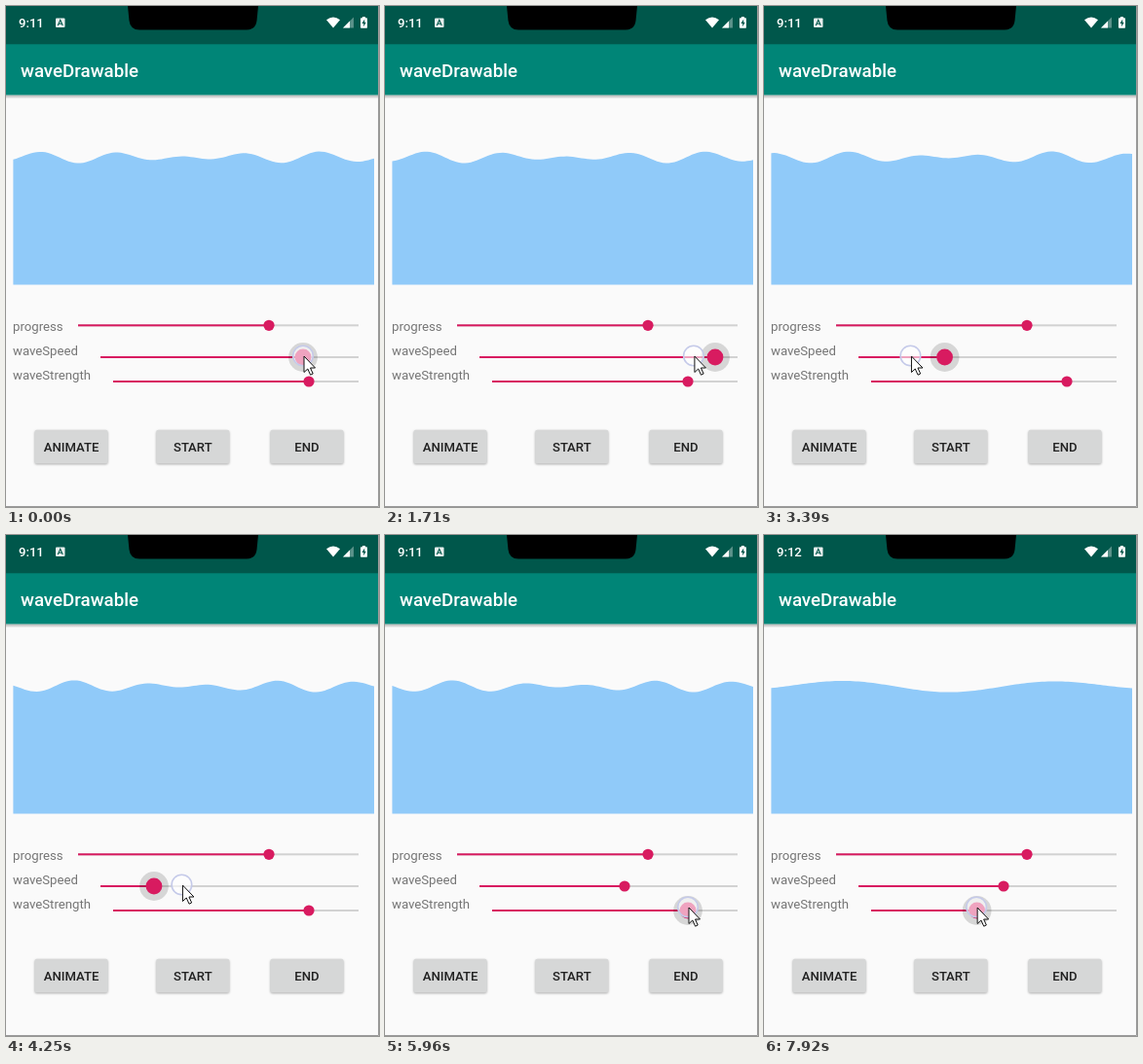
Write an HTML page that moves like this. It is 383 px wide and 515 px high and loops after 8000 ms.

```html
<!DOCTYPE html>
<html lang="en">
<head>
<meta charset="utf-8">
<title>Wave sliders</title>
<style>
  html, body { margin: 0; width: 100%; height: 100%; overflow: hidden; background: #fafafa; }
  svg { display: block; width: 100vw; height: 100vh; font-family: Roboto, sans-serif; font-size: 13.1px; }
  .medium { font-weight: 500; }
  .label { fill: #757575; font-size: 13.2px; }
  .button rect { fill: #d6d7d7; filter: drop-shadow(0 1px 1px rgba(0, 0, 0, .3)); }
  .button text { fill: #212121; font-weight: 500; text-anchor: middle; }
</style>
</head>
<body>
<svg viewBox="0 0 383 515">
  <defs>
    <linearGradient id="shade" x2="0" y2="1">
      <stop stop-color="#000" stop-opacity=".3"/>
      <stop offset="1" stop-color="#000" stop-opacity="0"/>
    </linearGradient>
  </defs>
  <rect width="383" height="515" fill="#fafafa"/>
  <rect y="91.500" width="383" height="4" fill="url(#shade)"/>
  <rect y="38" width="383" height="53.500" fill="#008577"/>
  <rect width="383" height="39.300" fill="#00574b"/>
  <path d="M125 0L126.500 15Q127.500 24.500 137 24.500H247Q256.500 24.500 257.500 15L259 0Z"/>

  <g fill="#fff">
    <text id="clock" class="medium" x="13" y="22"></text>
    <rect x="51" y="12.500" width="9.500" height="9.500" rx="1" fill="#e8efee"/>
    <path d="M53.300 20L55.750 14.300L58.200 20M54.200 18.200H57.300" fill="none" stroke="#00574b" stroke-width="1.100"/>
    <path d="M329 14.200Q336 8.700 343 14.200L336 22.500Z"/>
    <path d="M346 22.500L357 11.500V22.500Z" opacity=".35"/>
    <path d="M346 22.500L353 15.500V22.500Z"/>
    <path d="M364 13Q364 12.200 364.800 12.200H366V11H369V12.200H370.200Q371 12.200 371 13V22Q371 22.800 370.200 22.800H364.800Q364 22.800 364 22Z"/>
    <path d="M368.200 13.500L365.500 18H367.200V21.300L369.700 16.700H368.200Z" fill="#00574b"/>
    <text class="medium" x="15" y="73" font-size="18.700">waveDrawable</text>
  </g>

  <path id="wave" fill="#90caf9"/>
  <g id="sliders"></g>
  <g id="buttons"></g>
  <circle id="touch" r="10.300" fill="#fff" fill-opacity=".6" stroke="#c5cae9" stroke-width="1.600"/>
  <path id="cursor" d="M0 0V16.500L3.800 13L6.600 19.200L9.200 18L6.500 12H11.500Z" fill="#fff" stroke="#111"/>
  <path d="M382.500 0V514.500H0" fill="none" stroke="#9b9b9b"/>
</svg>
<script>
const LOOP = 8000, FIRST = 120, REFRESH = 132.2, SLACK = 40;
const LEFT = 7.4, RIGHT = 378, FLOOR = 286.5, LEVEL = 155.5;
const RELEASE = 5150, PRESS = 5420, LAG = 300;
const $ = id => document.getElementById(id);
const mix = (a, b, k) => a + (b - a) * k;
const clamp = (v, lo, hi) => Math.min(hi, Math.max(lo, v));
const turn = cycles => Math.cos(2 * Math.PI * cycles);

function set(node, attrs) {
  for (const name in attrs) node.setAttribute(name, attrs[name]);
}
function add(parent, tag, attrs, text = '') {
  const node = document.createElementNS('http://www.w3.org/2000/svg', tag);
  set(node, attrs);
  node.textContent = text;
  return parent.appendChild(node);
}

// Finger path: time, x
const path = [
  [0, 305], [720, 339], [1500, 339], [2070, 278], [2370, 258], [3090, 190],
  [3390, 152], [3750, 136], [4730, 229], [RELEASE, 246], [PRESS, 311],
  [6150, 311], [6450, 289], [6750, 261], [7400, 219], [LOOP, 218]
];
function fingerX(t) {
  t = clamp(t, 0, LOOP);
  const i = path.findIndex(([at]) => at >= t);
  if (i < 1) return path[0][1];
  const [t0, x0] = path[i - 1], [t1, x1] = path[i];
  return mix(x0, x1, (t - t0) / (t1 - t0));
}

// Thumbs trail the finger
const speedX = t => fingerX(Math.min(t - LAG, RELEASE));
const strengthX = t => fingerX(Math.max(t - LAG, PRESS));

function slider(name, x, y, labelY) {
  const g = $('sliders');
  add(g, 'text', { class: 'label', x: 7, y: labelY }, name);
  const rail = { x, y: y - 1, height: 2 };
  add(g, 'rect', { ...rail, width: 362 - x, fill: '#d2d2d2' });
  const bar = add(g, 'rect', { ...rail, fill: '#d81b60' });
  const halo = add(g, 'circle', { cy: y, r: 14.9, fill: '#000', 'fill-opacity': .14 });
  const thumb = add(g, 'circle', { cy: y, fill: '#d81b60' });
  return (value, pressed) => {
    set(bar, { width: value - x });
    set(halo, { cx: value, visibility: pressed ? 'visible' : 'hidden' });
    set(thumb, { cx: value, r: pressed ? 8.4 : 5.6 });
  };
}
const setProgress = slider('progress', 74, 328.3, 334);
const setSpeed = slider('waveSpeed', 97, 361, 359);
const setStrength = slider('waveStrength', 110, 386, 384);
setProgress(270, false);

[['ANIMATE', 67], ['START', 191.8], ['END', 309]].forEach(([name, x]) => {
  const g = add($('buttons'), 'g', { class: 'button' });
  add(g, 'rect', { x: x - 37.5, y: 435.8, width: 75, height: 34.5, rx: 2 });
  add(g, 'text', { x, y: 458 }, name);
});

// Cycles travelled so far, driven by the speed slider
function travel(t, step = 20) {
  let cycles = 0;
  for (let at = 0; at < t; at += step) {
    cycles += 1.3 * (speedX(at) - 97) / 265 * Math.min(step, t - at) / 1000;
  }
  return cycles;
}

// Two sines run left; less strength stretches them
function drawWave(t) {
  const length = 70.5 + 1.36 * (311 - strengthX(t));
  const phase = travel(t);
  let d = `M${LEFT} ${FLOOR}`;
  for (let n = 0; n <= 124; n++) {
    const x = mix(LEFT, RIGHT, n / 124);
    const u = (x - LEFT) / length;
    const y = LEVEL - 3.5 * turn(u - .44 + phase) - 2.6 * turn(u / 1.42 - .19 + phase);
    d += `L${x.toFixed(2)} ${y.toFixed(2)}`;
  }
  set($('wave'), { d: `${d}V${FLOOR}Z` });
}

function draw(time) {
  const tick = Math.floor((time - FIRST + SLACK) / REFRESH);
  const t = Math.max(0, FIRST + tick * REFRESH);
  const onSpeed = t < RELEASE, onStrength = t >= PRESS;
  const x = fingerX(t);
  const y = mix(359.5, 382.5, clamp((t - RELEASE) / (PRESS - RELEASE), 0, 1));
  drawWave(t);
  setSpeed(speedX(t), onSpeed);
  setStrength(strengthX(t), onStrength);
  set($('touch'), { cx: x, cy: y, visibility: onSpeed || onStrength ? 'visible' : 'hidden' });
  set($('cursor'), { transform: `translate(${x + 1} ${y + .5})` });
  $('clock').textContent = t < 7160 ? '9:11' : '9:12';
}

const start = performance.now();
function loop() {
  draw((performance.now() - start) % LOOP);
  requestAnimationFrame(loop);
}
loop();
</script>
</body>
</html>
```
